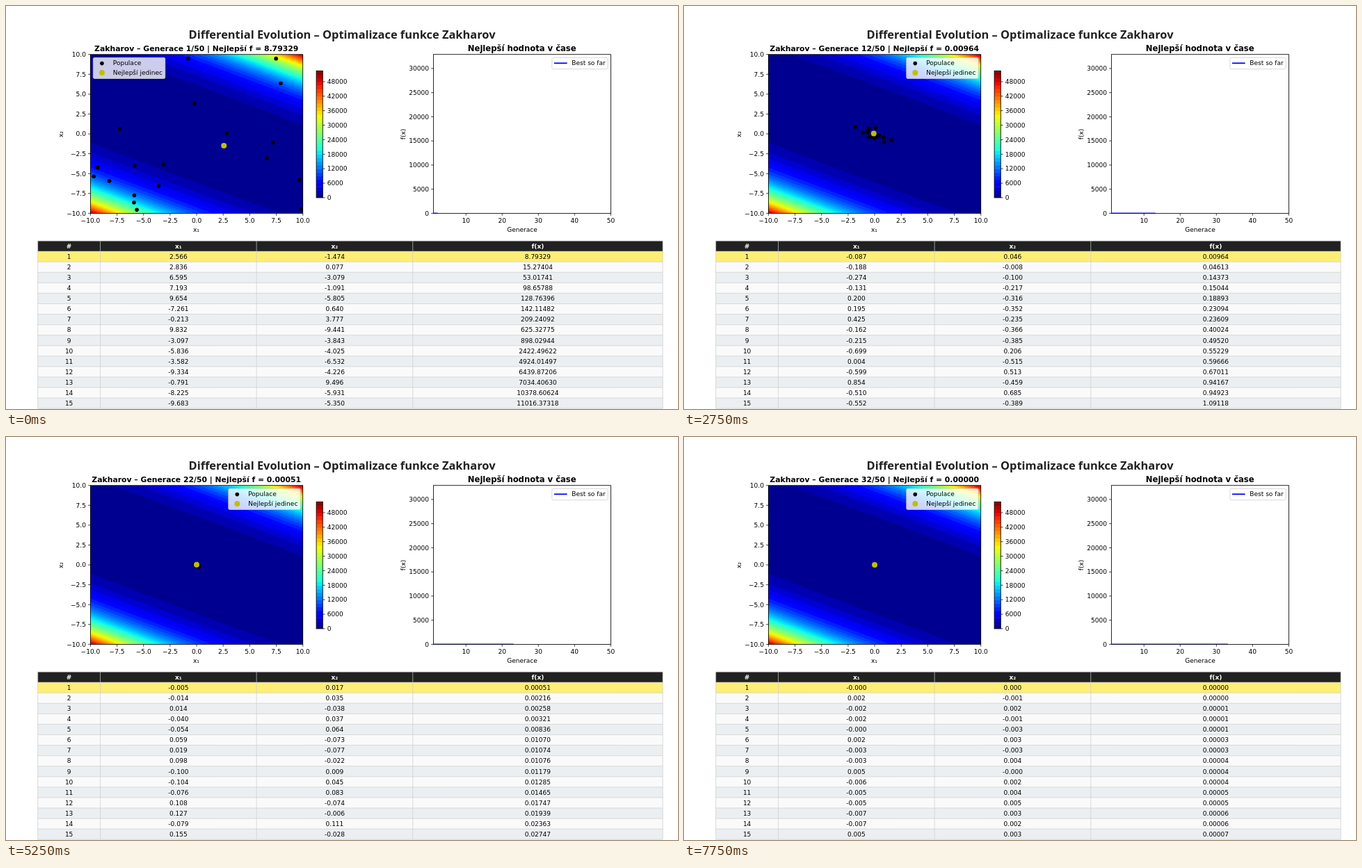
These frames come from a looping animation (966 px wide and 580 px high, 8000 ms). An HTML page with a canvas:

```html
<!DOCTYPE html>
<html lang="cs">
<head>
<meta charset="utf-8">
<title>Differential Evolution</title>
<style>
  html, body { margin: 0; overflow: hidden; background: #fff; }
  canvas { display: block; }
</style>
</head>
<body>
<canvas id="stage" width="966" height="580"></canvas>
<script>
const ctx = document.getElementById('stage').getContext('2d');
const FONT = 9.03, STEP_MS = 250, GENERATIONS = 32, SIZE = 20;
const LEVELS = 35, LEVEL_SIZE = 1500;
const MAP = { x: 121.4, y: 69.7, w: 305.3, h: 228.7 };
const CHART = { x: 614.4, y: 69.7, w: 255, h: 228.7 };
const BAR = { x: 446.1, y: 93.3, w: 9.2, h: 182.6 };
const BOTTOM = MAP.y + MAP.h;

// ---- Population ----
const zakharov = ([x, y]) => {
  const s = x / 2 + y;
  return x * x + y * y + s * s + s ** 4;
};
const ranked = points => [...points].sort((a, b) => zakharov(a) - zakharov(b));

let seed = 2024;
const random = () => (seed = seed * 16807 % 2147483647) / 2147483647;
const uniform = () => random() * 20 - 10;
const normal = () => 2 * (random() + random() + random()) - 3;

// The first generation fills the square, later ones gather along the valley y = -x/2.
function member(gen, best, spread) {
  let point;
  do {
    const x = gen === 1 ? uniform() : 2 * best[0] + spread * normal();
    point = [x, gen === 1 ? uniform() : spread * normal() / 2 - x / 2];
  } while (zakharov(point) <= zakharov(best));
  return point;
}

const milestones = [
  { gen: 1, best: [2.566, -1.473537] },
  { gen: 5, best: [.926, -1.1115793], spread: 2 },
  { gen: 12, best: [-.08671, .046], spread: .75 },
  { gen: 17, best: [-.08696, .041], spread: .22 },
  { gen: 22, best: [-.005, .01678], spread: .1 },
  { gen: 26, best: [-.0038, .0056], spread: .033 },
  { gen: 32, best: [-.0003, .0004], spread: .005 }
].map(({ gen, best, spread }) => ({
  gen,
  points: ranked([best, ...Array.from({ length: SIZE - 1 }, () => member(gen, best, spread))])
}));

// Between milestones the members are replaced one after another.
function populationAt(g) {
  const k = Math.max(1, milestones.findIndex(m => g <= m.gen));
  const from = milestones[k - 1], to = milestones[k];
  const progress = (g - from.gen) / (to.gen - from.gen);
  return ranked(from.points.map((old, i) =>
    progress > (i * 7 + 13) % SIZE / SIZE ? to.points[i] : old));
}

// ---- Drawing helpers ----
function text(str, x, y, { size = FONT, align = 'center', bold = false, color = '#000', turn = 0, family = 'DejaVu Sans' } = {}) {
  ctx.save();
  ctx.translate(x, y);
  ctx.rotate(turn);
  ctx.font = `${bold ? 'bold ' : ''}${size}px "${family}", sans-serif`;
  ctx.textAlign = align;
  ctx.fillStyle = color;
  ctx.fillText(str, 0, size * .365);
  ctx.restore();
}

function line(x1, y1, x2, y2, color = '#000', width = .75) {
  ctx.strokeStyle = color;
  ctx.lineWidth = width;
  ctx.beginPath();
  ctx.moveTo(x1, y1);
  ctx.lineTo(x2, y2);
  ctx.stroke();
}

function dot(x, y, r, color) {
  ctx.fillStyle = color;
  ctx.beginPath();
  ctx.arc(x, y, r, 0, 7);
  ctx.fill();
}

function frame({ x, y, w, h }) {
  ctx.strokeStyle = '#000';
  ctx.lineWidth = .85;
  ctx.strokeRect(x, y, w, h);
}

function legendBox(x, y, w, h) {
  ctx.beginPath();
  ctx.roundRect(x, y, w, h, 2);
  ctx.fillStyle = 'rgba(255,255,255,.8)';
  ctx.fill();
  ctx.strokeStyle = 'rgba(204,204,204,.8)';
  ctx.lineWidth = .9;
  ctx.stroke();
}

const signed = v => v.toFixed(1).replace('-', '\u2212');

function tickX(x, label) {
  line(x, BOTTOM, x, BOTTOM + 3.3);
  text(label, x, 308.5);
}
function tickY(x, y, label) {
  line(x - 3.3, y, x, y);
  text(label, x - 6.5, y, { align: 'right' });
}

function jet(t) {
  const r = Math.min((t - .35) / .31, 1 - (t - .89) / .22);
  const g = Math.min((t - .125) / .25, (.91 - t) / .27);
  const b = Math.min(.5 + t / .22, (.65 - t) / .31);
  return `rgb(${[r, g, b].map(v => Math.round(255 * Math.min(1, Math.max(0, v))))})`;
}
const levelColors = Array.from({ length: LEVELS }, (_, i) => jet((i + .5) / LEVELS));

const mapX = x => MAP.x + (x + 10) / 20 * MAP.w;
const mapY = y => MAP.y + (10 - y) / 20 * MAP.h;

const contours = document.createElement('canvas');
contours.width = Math.round(MAP.w);
contours.height = Math.round(MAP.h);
const paint = contours.getContext('2d');
for (let j = 0; j < contours.height; j++) {
  for (let i = 0; i < contours.width; i++) {
    const point = [(i + .5) / contours.width * 20 - 10, 10 - (j + .5) / contours.height * 20];
    paint.fillStyle = levelColors[Math.floor(zakharov(point) / LEVEL_SIZE)];
    paint.fillRect(i, j, 1, 1);
  }
}

// ---- Panels ----
function drawMap(points, g) {
  const best = points[0];
  text(`Zakharov – Generace ${g}/50 | Nejlepší f = ${zakharov(best).toFixed(5)}`, 273.7, 61,
    { size: 10.83, bold: true });
  ctx.drawImage(contours, MAP.x, MAP.y, MAP.w, MAP.h);
  for (const [x, y] of points) dot(mapX(x), mapY(y), 2.8, '#000');
  dot(mapX(best[0]), mapY(best[1]), 4, '#bfbf00');
  frame(MAP);
  for (let v = -10; v <= 10; v += 2.5) {
    tickX(mapX(v), signed(v));
    tickY(MAP.x, mapY(v), signed(v));
  }
  text('x₁', 273.5, 322);
  text('x₂', 79, 184.5, { turn: -Math.PI / 2 });

  const left = g === 1 ? 125.3 : 319.7;
  legendBox(left, 74.3, 103.5, 30.2);
  dot(left + 12.6, 82.6, 2.8, '#000');
  dot(left + 12.6, 96, 4, '#bfbf00');
  text('Populace', left + 28.5, 81.8, { align: 'left' });
  text('Nejlepší jedinec', left + 28.5, 95.4, { align: 'left' });
}

function drawColorBar() {
  const h = BAR.h / LEVELS, right = BAR.x + BAR.w;
  levelColors.forEach((color, i) => {
    ctx.fillStyle = color;
    ctx.fillRect(BAR.x, BAR.y + BAR.h - (i + 1) * h, BAR.w, h + (i ? .5 : 0));
  });
  frame(BAR);
  for (let v = 0; v <= 48000; v += 6000) {
    const y = BAR.y + BAR.h - v / LEVEL_SIZE * h;
    line(right, y, right + 3.3, y);
    text(v, 461.8, y, { align: 'left' });
  }
}

function drawChart(g) {
  const genX = n => CHART.x + (n - 1) / 49 * CHART.w;
  text('Nejlepší hodnota v čase', 741.7, 61, { size: 11.6, bold: true });
  line(CHART.x, BOTTOM - .4, genX(g + 1) + .9, BOTTOM - .4, '#00f', .9);
  frame(CHART);
  for (let n = 10; n <= 50; n += 10) tickX(genX(n), n);
  for (let v = 0; v <= 30000; v += 5000) tickY(CHART.x, BOTTOM - v * .00695, v);
  text('Generace', 742, 322);
  text('f(x)', 571, 184.5, { turn: -Math.PI / 2 });
  legendBox(784.8, 74.3, 80.2, 16.4);
  line(788, 82.3, 806.6, 82.3, '#00f', 1.8);
  text('Best so far', 813.3, 82.2, { align: 'left' });
}

function drawTable(points) {
  const top = 338.1, rowH = 15.07, left = 45.7, width = 898.4;
  const edges = [0, .1, .35, .6, 1].map(part => left + part * width);
  const rows = [['#', 'x₁', 'x₂', 'f(x)'], ...points.slice(0, 15).map((p, i) =>
    [i + 1, p[0].toFixed(3), p[1].toFixed(3), zakharov(p).toFixed(5)])];
  rows.forEach((cells, r) => {
    const y = top + r * rowH;
    ctx.fillStyle = r === 0 ? '#212121' : r === 1 ? '#ffee75' : r % 2 ? '#eceff1' : '#fafafa';
    ctx.fillRect(left, y, width, rowH);
    cells.forEach((cell, c) => text(cell, (edges[c] + edges[c + 1]) / 2, y + rowH / 2,
      r ? {} : { bold: true, color: '#fff' }));
  });
  const bottom = top + rows.length * rowH;
  for (let y = top; y < bottom + 1; y += rowH) line(left, y, left + width, y, '#ccc', .7);
  for (const x of edges) line(x, top, x, bottom, '#ccc', .7);
}

function draw(now) {
  const g = 1 + Math.floor(now / STEP_MS) % GENERATIONS;
  const points = populationAt(g);
  ctx.fillStyle = '#fff';
  ctx.fillRect(0, 0, 966, 580);
  text('Differential Evolution – Optimalizace funkce Zakharov', 483, 41.5,
    { size: 16.4, bold: true, color: '#212121', family: 'Open Sans' });
  drawMap(points, g);
  drawColorBar();
  drawChart(g);
  drawTable(points);
  requestAnimationFrame(draw);
}
requestAnimationFrame(draw);
</script>
</body>
</html>
```
